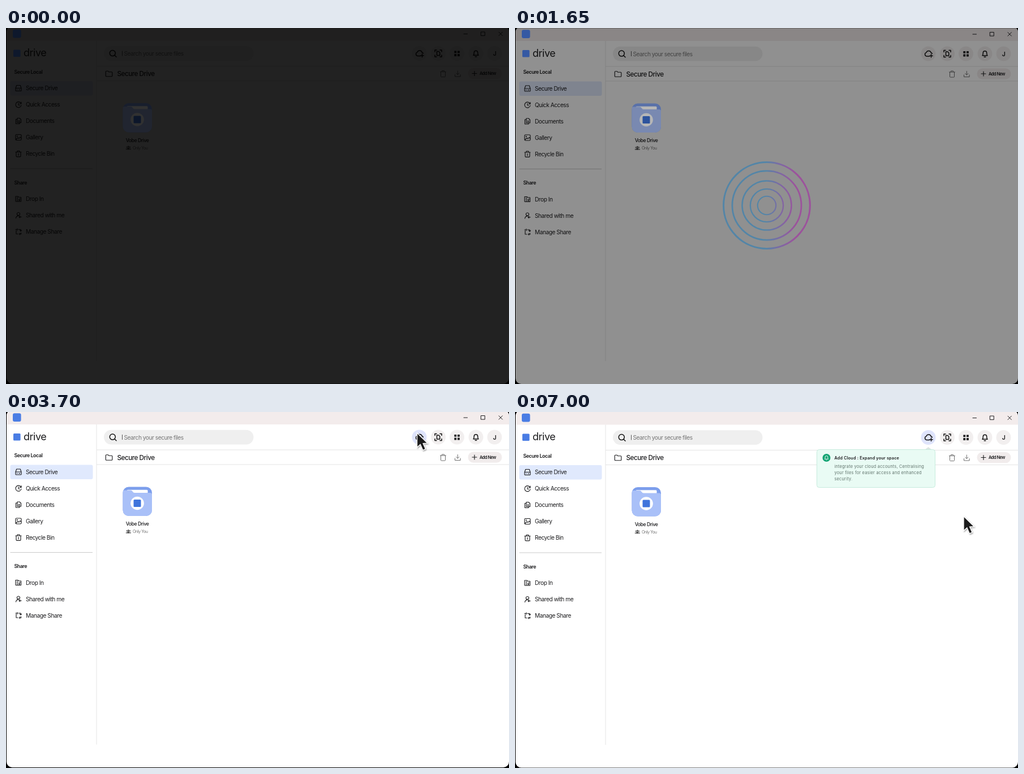
Write an HTML page that moves like this. It is 889 px wide and 630 px high and loops after 8 s.

```html
<!DOCTYPE html>
<html lang="en">
<head>
<meta charset="utf-8">
<title>Secure file manager</title>
<style>
  html, body { margin: 0; width: 100%; height: 100%; overflow: hidden; background: #000; }
  svg { display: block; width: 100vw; height: 100vh; font-family: Inter, "Open Sans", sans-serif; letter-spacing: -.03em; }
  text { fill: #1c1c1e; }
  .bold { font-weight: 600; }
  .medium { font-weight: 500; }
  .grey { fill: #757575; }
  .icon { fill: none; stroke: #1c1c1e; stroke-width: 1.15; stroke-linecap: round; stroke-linejoin: round; }
  .heavy { stroke: #111; stroke-width: 1.5; }
  .thin { stroke-width: 1; }
  .faint { stroke: #707070; stroke-width: 1; }
  .rule { stroke: #e4e4e4; }
  .tip { letter-spacing: .2px; }
  .tip .body { fill: #63766f; }
</style>
</head>
<body>
<svg viewBox="0 0 889 630">
  <defs>
    <linearGradient id="ringColor" gradientUnits="userSpaceOnUse" x1="443" x2="496" y1="0" y2="0">
      <stop offset="0" stop-color="#1f7dbd"/>
      <stop offset=".45" stop-color="#6a48b8"/>
      <stop offset="1" stop-color="#a81ca8"/>
    </linearGradient>
    <filter id="shadow" x="-50%" y="-50%" width="200%" height="200%">
      <feDropShadow dx="1" dy="1.5" stdDeviation="1.2" flood-opacity=".4"/>
    </filter>
    <clipPath id="frame"><rect x="1" y="-3" width="888" height="632.5" rx="10"/></clipPath>
  </defs>

  <g id="app">
    <g clip-path="url(#frame)">
      <rect width="889" height="630" fill="#fff"/>
      <rect width="889" height="22.5" fill="#f3ecec"/>
    </g>
    <path class="icon thin" d="M809 10.5h6.5M839.7 7h6.6v6.6h-6.6zM871 7.2l6.4 6.4m0-6.4l-6.4 6.4"/>

    <path class="rule" d="M160 22.5V589M160 67.5H889M160 93.5H889"/>
    <path d="M7.5 249H153" stroke="#cacaca"/>

    <text x="31" y="50.3" font-size="18">drive</text>
    <text class="bold" x="14.5" y="80.8" font-size="8.9">Secure Local</text>
    <text class="bold" x="14.5" y="276.8" font-size="8.9">Share</text>
    <rect x="7.5" y="94" width="146" height="25.5" rx="3" fill="#e0e9fd"/>
    <g id="menu"></g>

    <rect x="173" y="32.3" width="264.5" height="25.6" rx="12.8" fill="#efefef"/>
    <g class="icon heavy"><circle cx="188.3" cy="44.6" r="5"/><path d="M192 48.3l3 3"/></g>
    <path d="M205.5 40.5v9" stroke="#555"/>
    <text class="grey" x="208.5" y="49" font-size="10.2">Search your secure files</text>

    <g id="buttons"></g>
    <g class="icon heavy">
      <path d="M727.5 49.5a3.4 3.4 0 0 1-.6-6.6a4.5 4.5 0 0 1 8.6.6a2.8 2.8 0 0 1 1.9 1.4M727.5 49.5h5M735.5 46v5.4M732.8 48.7h5.4"/>
      <path d="M758 42v-3h3M767 39h3v3M770 48v3h-3M761 51h-3v-3M761.5 41.5h3.2l2 2v5h-5.2z"/>
      <path d="M826 48.3c1.3-1.2 1.3-3 1.3-4.8a3.2 3.2 0 0 1 6.4 0c0 1.8 0 3.6 1.3 4.8zM829.2 50.8h2.6"/>
    </g>
    <path d="M792.3 40.4h3.9v3.9h-3.9zM798 40.4h3.9v3.9h-3.9zM792.3 46.1h3.9v3.9h-3.9zM798 46.1h3.9v3.9h-3.9z" fill="#1c1c1e"/>
    <text class="bold" x="863.5" y="49" font-size="10.5" text-anchor="middle">J</text>

    <path class="icon" d="M176.3 77.2a1 1 0 0 1 1-1h3l1.5 1.6h5a1 1 0 0 1 1 1v6a1 1 0 0 1-1 1h-9.5a1 1 0 0 1-1-1z"/>
    <text class="medium" x="196.5" y="85.2" font-size="11.7">Secure Drive</text>
    <path class="icon faint" d="M767.5 77.5h10M770.5 77.3v-1.8h4v1.8M768.5 77.6v8a1 1 0 0 0 1 1h6a1 1 0 0 0 1-1v-8M798.3 76v6.5m-2.6-2.5l2.6 2.6l2.6-2.6M793.5 82.5v3.5h9.6v-3.5"/>
    <rect x="816.5" y="71" width="60" height="19.2" rx="9.6" fill="#f1ecec"/>
    <path class="icon" d="M824 80.5h8m-4-4v8"/>
    <text class="bold" x="837" y="83.3" font-size="7.4">Add New</text>

    <text class="medium" x="232" y="201.7" font-size="8.7" text-anchor="middle">Vobe Drive</text>
    <g fill="#555">
      <circle cx="216.3" cy="210" r="1.5"/><circle cx="213.6" cy="210.8" r="1.1"/><circle cx="219" cy="210.8" r="1.1"/>
      <path d="M214 215.2v-1.6a2.3 2 0 0 1 4.6 0v1.6zM212 215.2v-2h1.5v2zM219.2 215.2v-2h1.5v2z"/>
    </g>
    <text class="grey" x="224" y="214.8" font-size="7.2">Only You</text>

    <g id="tooltip" class="tip">
      <path d="M724.5 66.5l6-4.5l6 4.5z" fill="#dce6e3"/>
      <rect x="533.5" y="66.5" width="209" height="67" rx="4" fill="#e9fbf4" stroke="#c6ebdd"/>
      <circle cx="550.5" cy="81" r="7" fill="#14a574"/>
      <path fill="none" stroke="#fff" stroke-width=".9" d="M547.3 83.3c1-1 .8-2 .8-3.3a2.4 2.4 0 0 1 4.8 0c0 1.3-.2 2.3.8 3.3zM549.7 85h1.6"/>
      <text class="bold" x="564.5" y="84.2" font-size="7.2">Add Cloud : Expand your space</text>
      <g font-size="7.4">
        <text class="body" x="564.5" y="99.2">integrate your cloud accounts, Centralising</text>
        <text class="body" x="564.5" y="110.2">your files for easier access and enhanced</text>
        <text class="body" x="564.5" y="121.2">security.</text>
      </g>
    </g>
  </g>

  <rect id="dim" width="889" height="630"/>

  <!-- Coloured artwork keeps a little more light than the rest while dimmed -->
  <g id="artwork">
    <rect x="12" y="2.8" width="14.6" height="14.6" rx="3" fill="#4a7de4"/>
    <rect x="13" y="38.5" width="12.6" height="12.6" rx="1.5" fill="#4a7de4"/>
    <rect x="206.5" y="133" width="51.5" height="51.5" rx="10.5" fill="#7c9eec"/>
    <rect x="213.5" y="138.3" width="37" height="8" rx="1.5" fill="#fff"/>
    <path d="M206.5 142q0-3 3-3h11q2 0 3.3 2.2t3.5 2.3h27.7q3 0 3 3V174a10.5 10.5 0 0 1-10.5 10.5H217a10.5 10.5 0 0 1-10.5-10.5z" fill="#a9c0f8"/>
    <circle cx="232" cy="162" r="11.8" fill="#fff"/>
    <rect x="225.5" y="155.5" width="13" height="13" rx="1.5" fill="#3f74dc"/>
  </g>

  <g id="rings" fill="none" stroke="url(#ringColor)"></g>
  <path id="cursor" d="M0 0V25.5L5.8 20.3L10.3 30.5L15 28.4L10.6 18.6L18.5 18.2Z" fill="#1b1b1b" stroke="#fff" stroke-width="1.3" filter="url(#shadow)"/>
</svg>

<script>
const byId = id => document.getElementById(id);

const menuItems = [
  [106.5, "Secure Drive", "M-5 0L-3.3-5H3.3L5 0V4Q5 5 4 5H-4Q-5 5-5 4ZM-5 0H5M-2.5 2.6H-2M1 2.6H2.5"],
  [135.5, "Quick Access", "M4.8-1.5A5 5 0 1 0 5 1M5-4.5V-1.5H2M0-2.5V.5L2 1.5"],
  [164.5, "Documents", "M-2-5H2L4.5-2.5V3H-2ZM-2-3H-4.5V5H2V3M0-.5H2.5M0 1.2H2.5"],
  [193.5, "Gallery", "M-3.5-5H3.5Q5-5 5-3.5V3.5Q5 5 3.5 5H-3.5Q-5 5-5 3.5V-3.5Q-5-5-3.5-5ZM-4.5 4L-1 .5L1 2L3-.5L5 2M-2.5-2.5h.8v.8h-.8z"],
  [222.5, "Recycle Bin", "M-5-3H5M-2-3V-5H2V-3M-4-3V4Q-4 5.3-2.7 5.3H2.7Q4 5.3 4 4V-3M0-.5V3"],
  [302.5, "Drop In", "M-5 4V-4.5H-1L.5-3H4.5V4.5H-4.5M-2-3V4M1 3.5V0H3.5M1 1.5L2.5 2.8"],
  [331.5, "Shared with me", "M0-5A2.6 2.6 0 1 1-.1-5ZM-4.5 5Q-4 .8 0 .8M5 2.8H1M2.6 1.2L1 2.8L2.6 4.4"],
  [360.5, "Manage Share", "M-5-4H-2M0-4H4V-1M2.5-2.3L4-.8L5.5-2.3M-4-2.5V4H-1M1 4H5M-2-5.5V-2.5M2.5 2.5V5.5M4.5 2V3"],
];
byId("menu").innerHTML = menuItems.map(([y, label, icon]) =>
  `<path class="icon" transform="translate(22 ${y})" d="${icon}"/>
   <text x="35" y="${y + 3.8}" font-size="10.2">${label}</text>`).join("");

byId("buttons").innerHTML = [730.5, 764, 797, 830.5, 863.5].map(x =>
  `<circle cx="${x}" cy="45" r="13" fill="#f2efef"/>`).join("");
const cloudButton = byId("buttons").firstElementChild;

const ringDelays = [0, 110, 235, 338, 430];
byId("rings").innerHTML = ringDelays.map(() => `<circle cx="445" cy="314"/>`).join("");
const rings = [...byId("rings").children];

// Smooth 0 to 1 between two times
const ease = (t, from, to) => {
  const p = Math.min(1, Math.max(0, (t - from) / (to - from)));
  return p * p * (3 - 2 * p);
};

// Sums eased moves [from, to, change] on top of a start value
const track = (t, start, ...moves) =>
  moves.reduce((value, [from, to, change]) => value + change * ease(t, from, to), start);

const LOOP = 8000, STEP = 50;

function draw(now) {
  const t = Math.floor((now % LOOP) / STEP) * STEP;

  const shift = `translate(0 ${track(t, 0, [1150, 1600, .5], [2950, 3700, -1], [4550, 5300, .5])})`;
  byId("app").setAttribute("transform", shift);
  byId("artwork").setAttribute("transform", shift);

  const dim = .867 * (1 - ease(t, 1450, 1850));
  byId("dim").setAttribute("opacity", dim);
  byId("artwork").style.filter = dim ? `brightness(${1 - dim ** 1.5})` : "none";

  byId("rings").setAttribute("opacity", t < 1150 ? 0 : 1 - ease(t, 1530, 1780));
  rings.forEach((ring, i) => {
    const radius = .14 * (t - 1104 - ringDelays[i]);
    ring.setAttribute("r", radius > 5 ? radius : 0);
    ring.setAttribute("stroke-width", 1.9 + .015 * Math.max(0, radius));
  });

  const x = track(t, 880, [2950, 3700, -153.5], [4550, 5300, 67.5], [5400, 5800, -1]);
  const y = track(t, 640, [2950, 3700, -603], [4550, 5300, 150.5], [5400, 5800, -3]);
  byId("cursor").setAttribute("transform", `translate(${x} ${y})`);
  byId("cursor").setAttribute("visibility", t < 2950 ? "hidden" : "visible");
  cloudButton.setAttribute("fill", t < 3650 ? "#f2efef" : "#dfe4fc");
  byId("tooltip").setAttribute("opacity", ease(t, 4550, 4800));
}

const startTime = performance.now();
function tick() {
  draw(performance.now() - startTime);
  requestAnimationFrame(tick);
}
tick();
</script>
</body>
</html>
```
